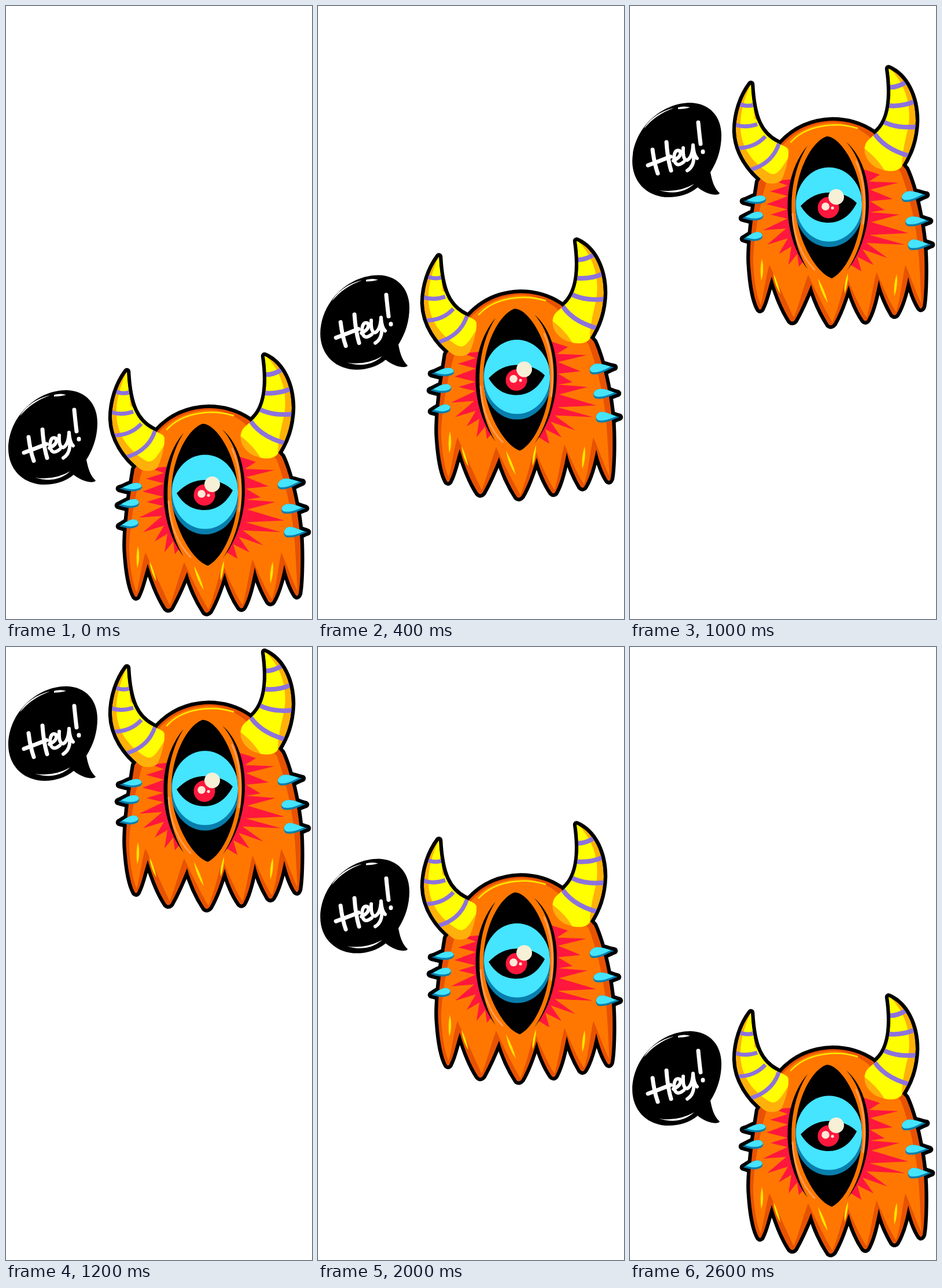
Write an HTML page that moves like this. It is 529x1058 px and loops after 2.8 s.

```html
<!DOCTYPE html>
<html lang="en">
<head>
<meta charset="utf-8">
<title>Hey monster</title>
<style>
html, body { margin: 0; width: 100%; height: 100%; overflow: hidden; background: #fff; }
svg { display: block; width: 100vw; height: 100vh; }
</style>
</head>
<body>
<svg viewBox="0 0 529 1058" preserveAspectRatio="none">
  <defs>
    <path id="body" d="M222 800L214 850C209 890 206 925 208 945C210 975 215 1005 223 1019Q226 1022 228 1016C234 1005 238 985 245 963C251 985 263 1018 277 1039Q281 1043 285 1038C294 1022 304 1000 313 977C320 1002 332 1028 344 1046Q348 1049 352 1044C362 1027 370 1005 378 978C384 1000 393 1022 404 1038Q408 1042 411 1036C420 1019 425 995 430 969C435 990 445 1013 454 1028Q458 1032 461 1027C470 1012 476 990 481 964C486 985 493 1005 501 1017Q504 1020 506 1014C509 998 510 960 509 930C508 880 492 810 477 778L420 715C395 698 370 694 350 694C315 695 285 708 262 733Z"/>
    <path id="hornL" d="M209 631C193 652 183 682 183 712C184 748 206 780 233 800C243 805 259 803 263 795C270 778 274 763 274 746C273 739 264 737 256 733C225 718 212 690 209 631Z"/>
    <path id="hornR" d="M447 604C477 617 494 653 494 694C493 727 484 751 469 774C459 785 438 781 424 774C409 764 403 750 406 739C408 727 418 723 427 714C447 696 455 660 447 604Z"/>
    <path id="spikes" d="M196 833C207 830 213 824 225 823C237 823 238 834 229 836C218 840 207 836 196 833ZM194 862C204 858 210 852 221 851C232 851 233 863 224 865C214 868 204 865 194 862ZM196 898C205 893 211 887 220 886C231 886 232 898 223 900C214 904 205 900 196 898ZM512 822C500 820 490 814 480 816C468 819 467 832 474 834C488 836 500 826 512 822ZM518 867C505 864 495 857 484 860C474 863 474 874 481 876C495 878 506 871 518 867ZM521 908C508 905 498 898 489 899C479 901 478 914 485 917C498 919 510 912 521 908Z"/>
    <path id="lens" d="M340 721C315 729 286 780 286 840C286 890 318 955 349 966C378 952 402 890 401 838C400 780 365 721 340 721Z"/>
    <clipPath id="inLens"><use href="#lens"/></clipPath>
    <clipPath id="inHornL"><use href="#hornL"/></clipPath>
    <clipPath id="inHornR"><use href="#hornR"/></clipPath>
    <clipPath id="inSpikes"><use href="#spikes"/></clipPath>
  </defs>

  <g id="scene">
    <!-- speech bubble -->
    <path d="M105 663C138 664 158 687 158 719C158 743 151 764 139 783C142 799 146 811 155 819C153 824 134 823 117 809C101 822 82 827 61 826C27 823 4 798 4 764C4 711 51 663 105 663Z"/>
    <g fill="#fff">
      <path d="M24 708C33 691 53 677 76 672C54 680 38 691 24 708Z"/>
      <path d="M83 671Q94 668 104 671Q95 674 83 674Z"/>
      <path d="M50 814Q83 819 111 803Q87 825 50 814Z"/>
    </g>
    <g fill="none" stroke="#fff" stroke-width="7" stroke-linecap="round" stroke-linejoin="round">
      <path d="M39 744Q42 768 48 785M63 731Q65 760 71 780M31 771Q50 764 70 756"/>
      <path d="M75 763Q91 755 86 746Q77 742 76 758Q78 777 93 765" stroke-width="6"/>
      <path d="M92 741Q91 763 99 762Q108 757 109 736Q110 753 116 759M110 752Q112 772 99 780" stroke-width="6"/>
      <path d="M118 697Q120 718 122 734M126 747V748"/>
    </g>

    <!-- silhouette outline -->
    <g stroke="#000" stroke-width="12.5" stroke-linejoin="round">
      <use href="#body"/><use href="#hornL"/><use href="#hornR"/><use href="#spikes"/>
    </g>

    <!-- body -->
    <use href="#body" fill="#e85203"/>
    <path fill="#ff7700" d="M237 796C222 846 213 905 213 939C214 967 219 997 226 1012C231 995 234 966 241 943C253 968 270 1007 283 1034C292 1013 298 986 308 960C322 990 338 1022 350 1042C360 1018 366 992 374 962C386 990 398 1018 409 1034C416 1010 419 984 426 955C437 980 449 1008 460 1024C468 1000 470 970 476 943C486 965 494 990 504 1010C502 978 501 950 499 925C496 880 484 825 468 783L412 720C392 704 370 697 350 697C318 698 288 711 265 735Z"/>
    <path fill="none" stroke="#ffe600" stroke-width="2.6" stroke-linecap="round" d="M278 731C306 700 358 696 393 707"/>
    <g fill="#ffe600">
      <path d="M228 932Q233 953 227 970Q224 950 228 932Z"/>
      <path d="M248 958Q257 975 260 993Q250 978 248 958Z"/>
      <path d="M325 966Q337 987 342 1008Q329 990 325 966Z"/>
      <path d="M377 957Q377 977 371 992Q369 974 377 957Z"/>
      <path d="M461 959Q464 978 457 997Q455 977 461 959Z"/>
    </g>

    <!-- rays -->
    <g fill="#ff173d">
      <path d="M290 794L250 798L273 806L242 816L273 824L236 838L272 847L243 856L272 863L230 883L270 880L237 908L273 897L257 924L279 911L274 943L289 924L292 946L304 932Z"/>
      <path d="M398 776L432 787L413 799L464 801L415 813L454 829L415 833L440 848L415 852L466 856L417 869L481 888L414 891L475 908L409 905L445 931L402 916L421 943L393 929L400 954L380 942Z"/>
    </g>

    <!-- eye -->
    <path fill="#ff7700" d="M306 738C264 790 264 890 306 948L349 970L375 952C422 890 422 775 375 733L340 718Z"/>
    <path d="M307 737C261 790 261 890 307 950C270 888 270 795 307 737Z"/>
    <path d="M374 731C426 775 426 890 374 954C419 890 419 780 374 731Z"/>
    <g fill="none" stroke="#ff9c55" stroke-width="3" stroke-linecap="round">
      <path d="M281 855C283 895 297 929 319 951"/>
      <path d="M391 764C405 795 408 836 403 872"/>
    </g>
    <use href="#lens"/>
    <g clip-path="url(#inLens)">
      <ellipse cx="344" cy="843.5" rx="59" ry="68.5" fill="#087ead"/>
      <ellipse cx="344" cy="838.5" rx="57" ry="64" fill="#45e4ff"/>
    </g>
    <path d="M295 841C310 825 326 818 346 818C366 818 381 825 392 836C381 858 364 870 343 870C323 870 307 861 295 841Z"/>
    <circle cx="343" cy="844" r="18.5" fill="#ff173d"/>
    <circle cx="356.5" cy="825.5" r="13.5" fill="#f5f0d6"/>
    <circle cx="338" cy="842" r="6.8" fill="#ffe9d9"/>
    <circle cx="350" cy="844.5" r="2.6" fill="#ffe9d9"/>

    <!-- horns -->
    <g clip-path="url(#inHornL)">
      <use href="#hornL" fill="#ffb00a"/>
      <path fill="#ffff00" d="M212 625C197 655 190 680 191 708C193 742 213 768 242 785C258 792 266 765 280 750V730L215 690Z"/>
      <g fill="none" stroke="#8d72dc" stroke-width="7">
        <path d="M186 663Q198 671 213 667"/>
        <path d="M178 699Q196 708 220 700"/>
        <path d="M180 741Q214 743 234 721"/>
        <path d="M203 780Q246 770 258 732"/>
      </g>
    </g>
    <g clip-path="url(#inHornR)">
      <use href="#hornR" fill="#ffb00a"/>
      <path fill="#ffff00" d="M443 598C474 625 486 662 482 698C479 722 468 745 470 790H446C436 772 426 757 400 738V720L440 695Z"/>
      <g fill="none" stroke="#8d72dc" stroke-width="8">
        <path d="M444 636Q460 638 476 628"/>
        <path d="M440 667Q467 672 494 660"/>
        <path d="M430 691Q456 709 498 704"/>
        <path d="M418 708Q435 742 484 755"/>
      </g>
    </g>

    <!-- side spikes -->
    <use href="#spikes" fill="#087ead"/>
    <g clip-path="url(#inSpikes)"><use href="#spikes" y="-3.5" fill="#45e4ff"/></g>
  </g>
</svg>
<script>
const LOOP = 2800, STEP = 200, RISE = 99.2;
const scene = document.getElementById('scene');

// Six hops up, one rest, six hops down, one rest.
function draw(time) {
  const i = Math.floor((time % LOOP) / STEP);
  const level = i < 7 ? i : 13 - i;
  scene.setAttribute('transform', `translate(0 ${-RISE * level})`);
}

function tick() {
  draw(performance.now());
  requestAnimationFrame(tick);
}
tick();
</script>
</body>
</html>
```
